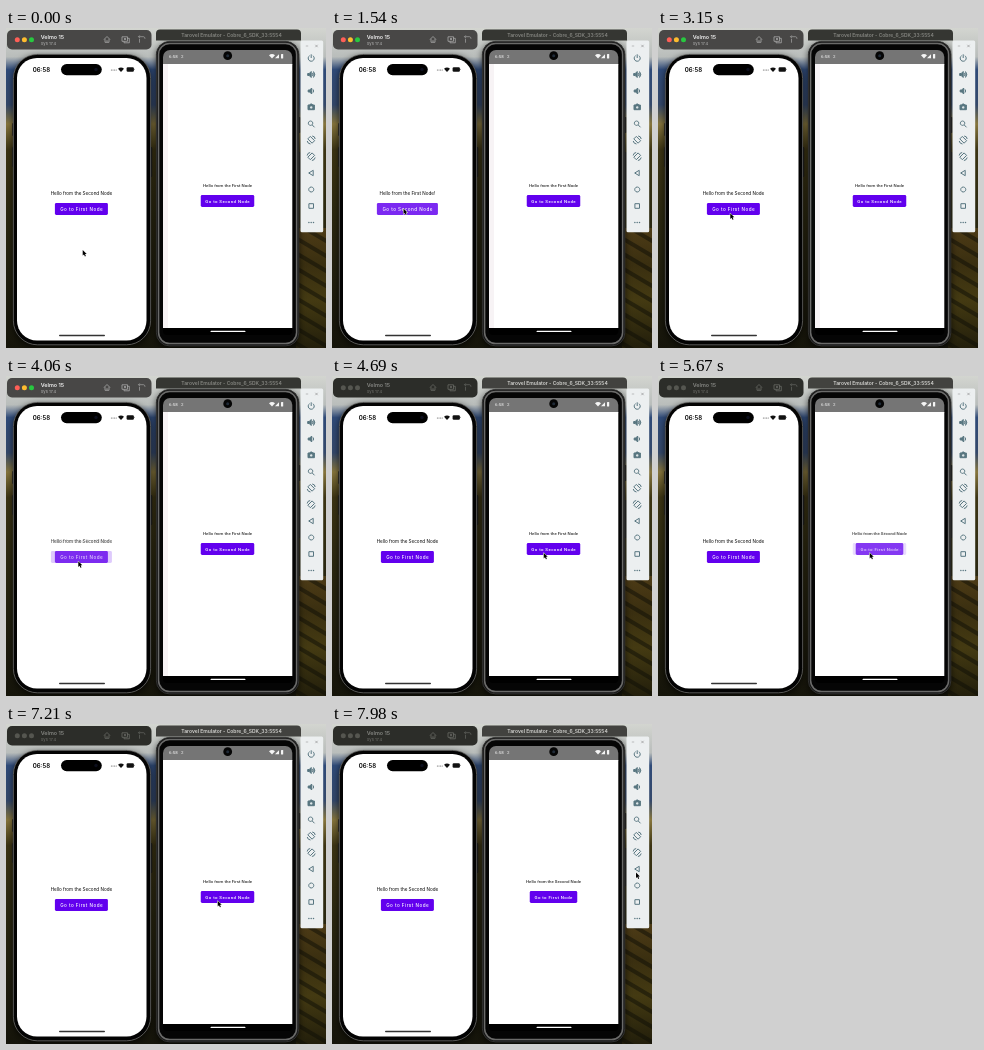
Recreate the animation shown at these times as an HTML page with a canvas. Size 320 by 320 pixels, loop 8000 ms.

```html
<!DOCTYPE html>
<html lang="en">
<head>
<meta charset="utf-8">
<title>Two simulators</title>
<style>
html, body { margin: 0; width: 100%; height: 100%; overflow: hidden; background: #1c1a0e; }
canvas { display: block; width: 100vw; height: 100vh; }
</style>
</head>
<body>
<canvas id="stage"></canvas>
<script>
const LOOP = 8000, STEP = 70, HOLD = 70, FADE = 300;
const canvas = document.getElementById('stage');
const ctx = canvas.getContext('2d');
const dpr = Math.max(1, window.devicePixelRatio || 1);
canvas.width = canvas.height = 320 * dpr;
ctx.scale(dpr, dpr);

const SANS = 'Inter, "Liberation Sans", sans-serif';
const ROBOTO = 'Roboto, "Liberation Sans", sans-serif';
const PURPLE = '#6200ee';

// Each click lights the button, then cross-fades to the other screen.
const phone = {
  x: 75.4, label: 167, top: 175, font: SANS, size: 4.6, gap: 0.46, mark: '!',
  first: 61, second: 53, start: 'second', clicks: [890, 1470, 1820, 2240, 3150, 3780]
};
const tablet = {
  x: 221.5, label: 159.2, top: 167, font: ROBOTO, size: 4.4, gap: 0.4, mark: '',
  first: 53.5, second: 47.5, start: 'first', clicks: [4900, 5530, 7210]
};

// Pointer moves: start time, end time, target x, target y.
const moves = [
  [700, 890, 71.5, 180.5], [2170, 2310, 72.3, 185.3],
  [4150, 4550, 211.7, 176.8], [7500, 7900, 304, 148.5]
];

const clamp = v => Math.max(0, Math.min(1, v));
const ease = v => v * v * (3 - 2 * v);

function rect(x, y, w, h, r, fill, stroke, line = 1) {
  ctx.beginPath();
  ctx.roundRect(x, y, w, h, r);
  if (fill) { ctx.fillStyle = fill; ctx.fill(); }
  if (stroke) { ctx.strokeStyle = stroke; ctx.lineWidth = line; ctx.stroke(); }
}

function disc(x, y, r, fill) {
  ctx.beginPath();
  ctx.arc(x, y, r, 0, Math.PI * 2);
  ctx.fillStyle = fill;
  ctx.fill();
}

function text(str, x, y, font, fill, align = 'left', gap = 0) {
  ctx.font = font;
  ctx.fillStyle = fill;
  ctx.textAlign = align;
  ctx.letterSpacing = gap + 'px';
  ctx.fillText(str, x, y);
}

function path(d, x, y, color, line = 0.9, fill = false) {
  const p = new Path2D(d);
  ctx.save();
  ctx.translate(x, y);
  if (fill) { ctx.fillStyle = color; ctx.fill(p); }
  else { ctx.strokeStyle = color; ctx.lineWidth = line; ctx.stroke(p); }
  ctx.restore();
}

function gradient(y0, y1, stops) {
  const g = ctx.createLinearGradient(0, y0, 0, y1);
  stops.forEach(([at, color]) => g.addColorStop(at, color));
  return g;
}

function wallpaper() {
  ctx.fillStyle = gradient(0, 320, [
    [0, '#d3d5d0'], [0.09, '#b9bdbb'], [0.13, '#2f4a78'], [0.24, '#34486a'],
    [0.3, '#86753c'], [0.38, '#3c3413'], [0.6, '#2a2710'], [1, '#15140a']
  ]);
  ctx.fillRect(0, 0, 320, 320);
  ctx.save();
  ctx.beginPath();
  ctx.rect(290, 200, 30, 120);
  ctx.clip();
  ctx.fillStyle = gradient(200, 320, [[0, '#4d3b16'], [0.3, '#3a2f10'], [0.6, '#443a12'], [1, '#221e0b']]);
  ctx.fillRect(290, 200, 30, 120);
  ctx.strokeStyle = 'rgba(14,14,6,.5)';
  ctx.lineWidth = 4;
  for (let y = 200; y < 330; y += 15) {
    ctx.beginPath();
    ctx.moveTo(288, y - 6);
    ctx.lineTo(322, y + 14);
    ctx.stroke();
  }
  ctx.restore();
}

// Dark soft shadow that a window casts on the wallpaper.
function shadow(x, y, w, h, r) {
  ctx.save();
  ctx.shadowColor = 'rgba(0,0,0,.75)';
  ctx.shadowBlur = 7 * dpr;
  ctx.shadowOffsetY = 2 * dpr;
  rect(x, y, w, h, r, '#000');
  ctx.restore();
}

function titleBars(rightActive) {
  rect(1, 2, 144.5, 19.5, 5, rightActive ? '#2c2d29' : '#484746');
  const dots = rightActive ? ['#555650', '#555650', '#555650'] : ['#fe5f57', '#febc2e', '#28c840'];
  dots.forEach((c, i) => disc(11.3 + i * 7.1, 11.7, 2.5, c));
  const ink = rightActive ? '#858682' : '#f0f0f0';
  const soft = rightActive ? '#70716c' : '#b5b5b5';
  text('Velmo 15', 34.7, 11.3, `600 5.4px ${SANS}`, ink);
  text('Sys 17.4', 34.7, 16.7, `4.1px ${SANS}`, soft);
  path('M-3 0 0-3 3 0M-2-.6V2.8H2V-.6M0 2.8V.6', 101, 11.5, soft, 0.7);
  path('M-3.5-2.5H2V2H-3.5ZM-1.5 2V3.5H3.8V-1H2', 119.5, 11.3, soft, 0.7);
  disc(119, 11, 0.9, soft);
  path('M-2.5-.5V3.5M-3.5-2.5H1.5Q3-2.3 3-.4M-2.2-3.8-3.5-2.5-2.2-1.2', 136, 11.2, soft, 0.6);

  rect(150, 1.5, 145, 11, [4, 4, 0, 0], rightActive ? '#42423f' : '#353632');
  text('Tarovel Emulator - Cobre_6_SDK_33:5554', 225.5, 9.3, `600 5px ${SANS}`,
    rightActive ? '#d5d5d2' : '#858681', 'center');
}

function wifi(x, y, color) {
  path('M-3-1.3Q0-3.8 3-1.3L0 2Z', x, y, color, 1, true);
}

function phoneFrame() {
  shadow(7.4, 26.4, 137.2, 290.4, 24);
  rect(6.2, 95, 2, 13, 1, '#141414');
  rect(6.2, 119, 2, 20, 1, '#141414');
  rect(144, 119, 2.2, 30, 1, '#141414');
  rect(7.4, 26.4, 137.2, 290.4, 24, '#030303', '#6c6c6a', 0.8);
  rect(11, 30, 129.5, 282.5, 20, '#fff');
  rect(55, 36, 40.8, 11.2, 5.6, '#000');
  disc(90, 41.5, 1.7, '#0c0e1c');
  text('06:58', 26.7, 44, `600 6.1px ${SANS}`, '#080808');
  for (let i = 0; i < 4; i++) disc(105.4 + i * 1.6, 42, 0.5, '#555');
  wifi(115, 42, '#111');
  rect(120.6, 39.2, 7.3, 4.5, 1.2, '#111');
  rect(128.2, 40.7, 0.7, 1.4, 0.3, '#777');
  rect(53, 306.8, 46, 1.5, 0.8, '#333');
}

function tabletFrame(rightActive) {
  shadow(150.4, 13.4, 142.4, 304.5, 13);
  rect(292.5, 89, 2.2, 16, 1, '#161616');
  rect(292.5, 124, 2.2, 38, 1, '#161616');
  rect(150.4, 13.4, 142.4, 304.5, 13, '#151515', '#3c3c3a', 0.8);
  rect(152.6, 15.6, 138, 300, 11, '#050505', '#6a6a69', 1.5);
  rect(157, 22, 129.3, 285, [7, 7, 4, 4], '#000');
  rect(157, 22, 129.3, 15, [7, 7, 0, 0], '#757575');
  ctx.fillStyle = '#fff';
  ctx.fillRect(157, 36, 129.3, 264);
  if (!rightActive) {
    ctx.fillStyle = '#f7f3f5';
    ctx.fillRect(157, 36, 5, 264);
  }
  text('6:58', 163, 30.3, `500 4.4px ${ROBOTO}`, '#e4e4e4');
  text('2', 175, 30.3, `500 4.4px ${ROBOTO}`, '#d2d2d2');
  disc(221.7, 27.7, 4.4, '#050505');
  disc(221.7, 27.7, 1.5, '#202b38');
  wifi(266, 28.5, '#f5f5f5');
  path('M0 4V0L-4 4Z', 273, 26.2, '#f5f5f5', 1, true);
  rect(275, 26, 2.2, 4.4, 0.5, '#f5f5f5');
  rect(204.5, 302.7, 35, 1.4, 0.7, '#fff');
}

const tools = [
  ['M-1.6-2.3A3 3 0 1 0 1.6-2.3M0-3.7V0', 30],
  ['M-3.5-1H-2L0-3V3L-2 1H-3.5ZM1.3-1.6Q2.4 0 1.3 1.6M2.3-3Q4.8 0 2.3 3', 46.5],
  ['M-3-1H-1.5L.5-3V3L-1.5 1H-3ZM1.8-1.6Q3 0 1.8 1.6', 63],
  ['M-3.2-2H-1.5L-.8-3H.8L1.5-2H3.2V2.7H-3.2ZM0-1A1.4 1.4 0 1 0 .1-1', 79],
  ['M-.7-3A2.2 2.2 0 1 0-.6-3M1 .9 3.3 3.3', 96],
  ['M-.9-3.6 3.4.7.9 3.2-3.4-1.1ZM-4 1Q-3.4 3.8-.7 4M1-4Q3.8-3.7 4-1', 112],
  ['M.9-3.6-3.4.7-.9 3.2 3.4-1.1ZM4 1Q3.4 3.8.7 4M-1-4Q-3.8-3.7-4-1', 128.5],
  ['M2-2.7V2.7L-2.5 0Z', 145],
  ['M0-2.5A2.5 2.5 0 1 0 .1-2.5', 161.5],
  ['M-2.3-2.3H2.3V2.3H-2.3Z', 178]
];

function toolbar() {
  const ink = '#587680';
  rect(294.5, 12.5, 22.7, 191.8, 1.5, '#eceff0');
  path('M-1.2 0H1.2', 301, 18, '#999', 0.6);
  path('M-1.2-1.2 1.2 1.2M1.2-1.2-1.2 1.2', 310.5, 18, '#888', 0.6);
  tools.forEach(([d, y], i) => {
    path(d, 305.2, y, ink, 1);
    if (i > 0 && i < 4) path(d, 305.2, y, ink, 1, true);
  });
  disc(305.2, 79.5, 1.1, '#dce5e7');
  for (let i = -1; i < 2; i++) disc(305.2 + i * 2.3, 194.5, 0.75, ink);
}

const other = name => name === 'first' ? 'second' : 'first';
const title = name => name === 'first' ? 'First' : 'Second';

function screen(d, name, alpha, ripple) {
  if (alpha <= 0) return;
  const w = d[name], mark = name === 'first' ? d.mark : '';
  ctx.save();
  ctx.globalAlpha = alpha;
  text(`Hello from the ${title(name)} Node${mark}`, d.x, d.label, `${d.size}px ${d.font}`, '#000', 'center');
  rect(d.x - w / 2, d.top, w, 12, 1.4, PURPLE);
  if (ripple > 0) rect(d.x - w / 2, d.top, w, 12, 1.4, `rgba(255,255,255,${0.16 * ripple})`);
  text(`Go to ${title(other(name))} Node`, d.x + d.gap / 2, d.top + 7.6,
    `500 ${d.size}px ${d.font}`, '#fff', 'center', d.gap);
  ctx.restore();
}

function content(d, t) {
  const past = d.clicks.filter(c => c <= t);
  const now = past.length % 2 ? other(d.start) : d.start;
  const since = past.length ? t - past[past.length - 1] : LOOP;
  const p = ease(clamp((since - HOLD) / FADE));
  screen(d, other(now), 1 - p, clamp(since / HOLD));
  screen(d, now, p, 0);
}

function pointer(t) {
  let x = 76.7, y = 222;
  for (const [a, b, tx, ty] of moves) {
    const k = ease(clamp((t - a) / (b - a)));
    x += (tx - x) * k;
    y += (ty - y) * k;
  }
  const d = 'M0 0V5.6L1.3 4.4 2.2 6.5 3.2 6.1 2.3 4H4Z';
  path(d, x, y, '#fff', 1);
  path(d, x, y, '#000', 1, true);
}

function draw(ms) {
  const t = Math.floor((ms % LOOP) / STEP) * STEP;
  const rightActive = t >= 4620;
  wallpaper();
  phoneFrame();
  tabletFrame(rightActive);
  titleBars(rightActive);
  toolbar();
  content(phone, t);
  content(tablet, t);
  pointer(t);
}

const begin = performance.now();
function tick() {
  draw(performance.now() - begin);
  requestAnimationFrame(tick);
}
tick();
</script>
</body>
</html>
```
